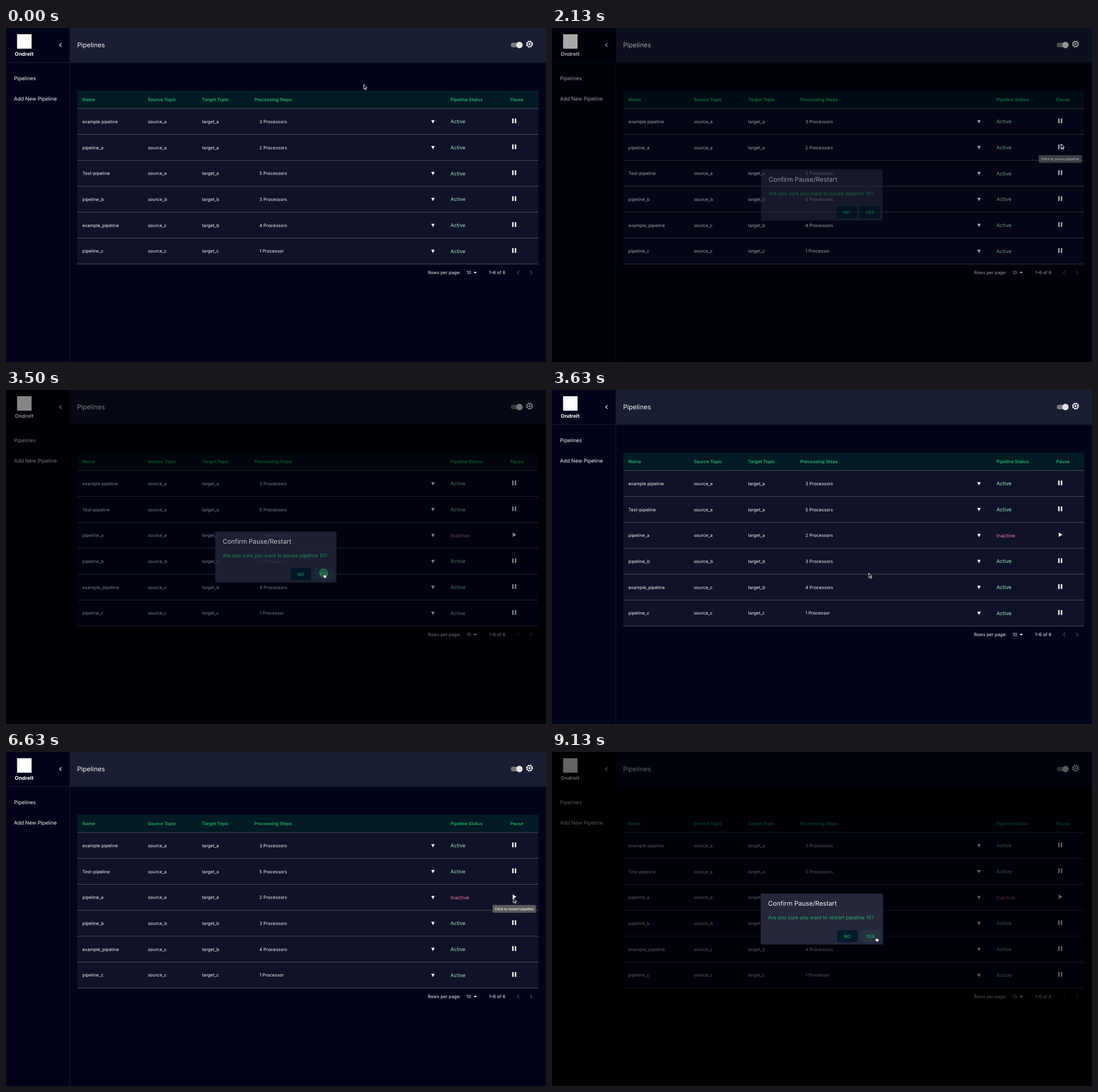
Recreate the animation shown at these times as an HTML page. Size 951 by 589 pixels, loop 9.25 s.

```html
<!DOCTYPE html>
<html lang="en">
<head>
<meta charset="utf-8">
<title>Pipelines</title>
<style>
html, body { margin: 0; width: 100%; height: 100%; overflow: hidden; background: #000; }
svg { display: block; width: 100vw; height: 100vh; }
text { font-family: Inter, sans-serif; text-rendering: geometricPrecision; white-space: pre; }
</style>
</head>
<body>
<svg id="stage" viewBox="0 0 951 589" preserveAspectRatio="none"></svg>
<script>
const LOOP = 9250, STEP = 125;
const GREEN = '#27b06a', WHITE = '#f4f4f6';
const ROW_H = 45.7, TABLE_TOP = 142;

// y is the middle of the capitals
const text = (x, y, size, str, fill = WHITE, weight = 400, anchor = 'start') =>
  `<text x="${x}" y="${y + size * 0.36}" font-size="${size}" fill="${fill}" font-weight="${weight}" text-anchor="${anchor}">${str}</text>`;
const rect = (x, y, w, h, fill, r = 0) =>
  `<rect x="${x}" y="${y}" width="${w}" height="${h}" rx="${r}" fill="${fill}"/>`;
const circle = (x, y, r, attrs) => `<circle cx="${x}" cy="${y}" r="${r}" ${attrs}/>`;
const shape = (d, attrs = `fill="${WHITE}"`) => `<path d="${d}" ${attrs}/>`;
const chevron = (x, y, dir, color) =>
  shape(`M${x - 1.6 * dir} ${y - 3.2}l${3.2 * dir} 3.2l${-3.2 * dir} 3.2`, `fill="none" stroke="${color}" stroke-width="1.2"`);

function row([name, source, target, count], i, inactive) {
  const y = TABLE_TOP + 23.1 + i * ROW_H, icon = y - 1.3;
  return text(134.6, y, 7.85, name)
    + text(249.7, y, 7.85, 'source_' + source)
    + text(345.2, y, 7.85, 'target_' + target)
    + text(446.3, y, 7.85, `${count} Processor${count > 1 ? 's' : ''}`)
    + shape(`M748.8 ${y - 2.7}h6.2l-3.1 6z`)
    + text(782.7, y, 9, inactive ? 'Inactive' : 'Active', inactive ? '#e47c9e' : '#a4e3bd')
    + (inactive ? shape(`M892.4 ${icon - 4}v8l6.5 -4z`)
                : rect(891.4, icon - 4.2, 2.6, 8.4, WHITE) + rect(896, icon - 4.2, 2.6, 8.4, WHITE))
    + rect(125.5, TABLE_TOP + (i + 1) * ROW_H - 0.5, 812, 1, '#505058');
}

function page() {
  const columns = [[134.6, 'Name'], [249.7, 'Source Topic'], [345.2, 'Target Topic'],
    [437.3, 'Processing Steps'], [782.7, 'Pipeline Status'], [888, 'Pause']];
  return rect(0, 0, 951, 589, '#010418')
    + rect(112.5, 0, 838.5, 60.5, '#1a1e33')
    + rect(112, 0, 1, 589, '#15192c') + rect(0, 60.5, 951, 1, '#1b1f30')
    + rect(19.5, 11, 25.5, 25.5, '#fff')
    + text(32, 45.3, 9, 'Ondrelt', '#fff', 700, 'middle')
    + chevron(96, 30, -1, WHITE)
    + text(14, 88.5, 9.05, 'Pipelines') + text(14, 124.8, 9.05, 'Add New Pipeline')
    + text(125.2, 30, 11.5, 'Pipelines')
    + rect(889, 26, 19, 8, '#77787e', 4) + circle(904.2, 30, 5.7, 'fill="#e2e2e2"')
    + circle(922, 28.4, 5.2, `fill="none" stroke="${WHITE}" stroke-width="1.8" stroke-dasharray="2.5 1.584"`)
    + circle(922, 28.4, 4.1, `fill="none" stroke="${WHITE}" stroke-width="1.5"`)
    + circle(922, 28.4, 1.8, `fill="${WHITE}"`)
    + rect(125.5, 110.5, 812, 31.5, '#021a24')
    + rect(125.5, TABLE_TOP, 812, 6 * ROW_H, '#0f1229')
    + rect(125.5, TABLE_TOP - 0.5, 812, 1, '#505058')
    + columns.map(([x, label]) => text(x, 126.4, 7.9, label, GREEN, 600)).join('')
    + text(743, 431.3, 7.85, 'Rows per page:') + text(811, 431.3, 7.85, '10')
    + shape('M823.3 430h6l-3 3z')
    + text(850.7, 431.3, 7.85, '1–6 of 6')
    + chevron(902.3, 431.2, -1, '#50535f') + chevron(925, 431.2, 1, '#50535f');
}

const rows = [['example pipeline', 'a', 'a', 3], ['pipeline_a', 'a', 'a', 2], ['Test-pipeline', 'a', 'a', 5],
  ['pipeline_b', 'b', 'b', 3], ['example_pipeline', 'c', 'b', 4], ['pipeline_c', 'c', 'c', 1]];
const pausedRows = [rows[0], rows[2], rows[1], ...rows.slice(3)];

function dialog(action, x, w, id) {
  const yes = x + w - 40.4, no = yes - 40.6;
  return `<g id="${id}">` + rect(x, 249.5, w, 90, '#25273b', 2)
    + text(x + 13.1, 267.3, 11.3, 'Confirm Pause/Restart')
    + text(x + 13.1, 292, 8.9, `Are you sure you want to ${action} pipeline 10?`, GREEN)
    + rect(no, 314.3, 36.2, 21, '#031a2a', 2) + text(no + 18.1, 324.8, 7.9, 'NO', GREEN, 500, 'middle')
    + `<rect class="yes" x="${yes}" y="314.3" width="36.2" height="21" rx="2"/>`
    + text(yes + 18.1, 324.8, 7.9, 'YES', GREEN, 500, 'middle')
    + '</g>';
}

const tooltip = (y, action, id) => `<g id="${id}">` + rect(857, y, 76.3, 13.6, '#5b5b5d', 2)
  + text(895.1, y + 6.8, 6.2, `Click to ${action} pipeline`, '#fff', 500, 'middle') + '</g>';

const outline = (fill, stroke) => `fill="${fill}" stroke="${stroke}" stroke-width=".9" stroke-linejoin="round"`;
const $ = id => document.getElementById(id);

$('stage').innerHTML = `<g id="page">${page()}`
  + `<g id="running">${rows.map((r, i) => row(r, i, false)).join('')}</g>`
  + `<g id="paused">${pausedRows.map((r, i) => row(r, i, i === 2)).join('')}</g></g>`
  + tooltip(224.2, 'pause', 'pauseTip') + tooltip(269.8, 'restart', 'restartTip')
  + dialog('pause', 368.4, 213.6, 'pauseDialog') + dialog('restart', 367.5, 215.5, 'restartDialog')
  + circle(559, 322.5, 8, 'id="ripple" fill="#2aa866" opacity=".4"')
  + '<g id="cursor">'
  + shape('M0 0V8.5L2 6.7L3.4 9.7L4.7 9.1L3.4 6.2H5.9Z', 'id="arrow" ' + outline('#0a0a10', '#fff'))
  + shape('M1.2 .8Q2 0 2.7 .9V3.4L6 4.1Q7 4.4 6.8 5.6L6.2 9H2.3L-.2 6Q-.4 5 .5 5L1.2 5.6Z', 'id="hand" ' + outline('#fff', '#111'))
  + '</g>';

// Piecewise track through [step, ...values]
const clamp = v => Math.min(1, Math.max(0, v));
const smooth = u => u * u * (3 - 2 * u);
function track(keys, n, ease = u => u) {
  const i = Math.max(0, keys.findLastIndex(k => k[0] <= n));
  const a = keys[i], b = keys[i + 1] || a;
  const u = ease(clamp((n - a[0]) / (b[0] - a[0] || 1)));
  return a.slice(1).map((v, j) => v + (b[j + 1] - v) * u);
}

const cursorKeys = [[0, 630, 99.5], [5, 896.5, 204.5], [17, 896.5, 204.5], [24, 558, 322.7], [32, 558, 322.7],
  [40, 893.3, 257.5], [55, 893.3, 257.5], [62, 583, 323.5], [66, 569, 325.5]];
const pauseTipKeys = [[5, 0], [7, 1], [16, 1], [17, 0.65], [18, 0]];
const restartTipKeys = [[40, 0], [42, 1], [54, 1], [55, 0.5], [56, 0]];
const pauseDialogKeys = [[16, 0], [17, 0.58], [18, 1], [27, 1], [28, 0.8], [29, 0]];
const restartDialogKeys = [[54, 0], [55, 0.85], [56, 1]];

function draw(time) {
  const n = Math.floor((time % LOOP) / STEP);
  const show = (id, opacity) => { $(id).style.opacity = opacity; };
  const [pauseOpen] = track(pauseDialogKeys, n), [restartOpen] = track(restartDialogKeys, n);
  const dim = Math.max(pauseOpen, restartOpen);
  const overYes = (n >= 24 && n <= 28) || n >= 63;

  $('page').style.filter = dim ? `brightness(${1 - 0.6 * dim}) contrast(${1 + 0.08 * dim})` : 'none';
  show('running', +(n < 28));
  show('paused', +(n >= 28));
  show('pauseTip', track(pauseTipKeys, n)[0]);
  show('restartTip', track(restartTipKeys, n)[0]);
  show('pauseDialog', pauseOpen);
  show('restartDialog', restartOpen);
  show('ripple', n === 28 ? 0.4 : 0);
  document.querySelectorAll('.yes').forEach(b => b.setAttribute('fill', overYes ? '#26323f' : '#031a2a'));

  const [x, y] = track(cursorKeys, n, smooth);
  $('cursor').setAttribute('transform', `translate(${x} ${y})`);
  show('arrow', +!overYes);
  show('hand', +overYes);
}

const start = performance.now();
function tick() {
  draw(performance.now() - start);
  requestAnimationFrame(tick);
}
tick();
</script>
</body>
</html>
```
